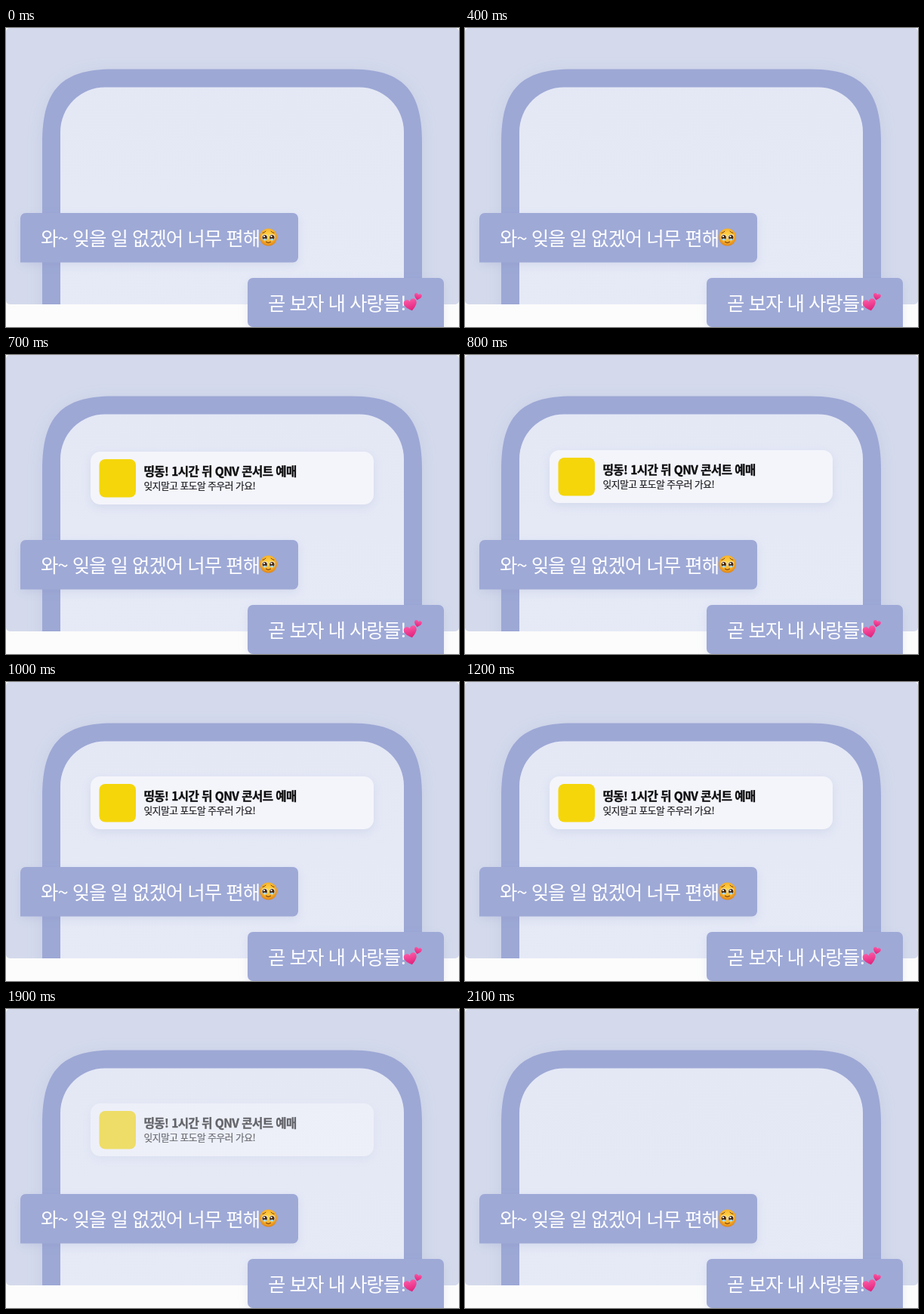
These frames come from a looping animation (600 px wide and 396 px high, 2200 ms). An HTML page:

```html
<!DOCTYPE html>
<html lang="ko">
<head>
<meta charset="utf-8">
<style>
  html, body { margin: 0; width: 100%; height: 100%; overflow: hidden; background: #fcfcfc; }
  svg { display: block; width: 600px; height: 396px; }
  text { font-family: "Noto Sans CJK KR", "Noto Sans CJK", "Noto Sans KR", sans-serif; }
  .phone { filter: drop-shadow(0 4px 10px rgba(120, 135, 190, .16)); }
  .bubble { fill: #9ea9d6; filter: drop-shadow(0 4px 6px rgba(120, 135, 190, .15)); }
  .chat { fill: #fff; font-size: 25.5px; letter-spacing: -1.05px; }
  .title { fill: #0c0c0e; stroke: #0c0c0e; stroke-width: .35px; font-size: 15.5px; font-weight: 700; letter-spacing: -.5px; }
  .note { fill: #1c1c20; stroke: #1c1c20; stroke-width: .2px; font-size: 12.75px; letter-spacing: -.5px; }
  .panel { fill: #f4f5fb; filter: drop-shadow(0 4px 6px rgba(120, 135, 190, .15)); }
  .card { animation: notify 2200ms step-end infinite; }

  /* the picture advances in 100 ms ticks */
  @keyframes notify {
    0%      { opacity: 0;   transform: translateY(20px); }
    22.727% { opacity: .5;  transform: translateY(18px); }
    27.273% { opacity: 1;   transform: translateY(8px); }
    31.818% { opacity: 1;   transform: translateY(3px); }
    36.364% { opacity: 1;   transform: translateY(1px); }
    40.909% { opacity: 1;   transform: translateY(.3px); }
    45.455% { opacity: 1;   transform: none; }
    81.818% { opacity: .9;  transform: none; }
    86.364% { opacity: .6;  transform: none; }
    90.909% { opacity: .25; transform: none; }
    95.455%, 100% { opacity: 0; transform: none; }
  }
</style>
</head>
<body>
<svg viewBox="0 0 600 396">
  <defs>
    <clipPath id="stage"><rect width="600" height="366" rx="5"/></clipPath>
    <linearGradient id="screen" x2="0" y2="1">
      <stop stop-color="#e4e8f5"/>
      <stop offset="1" stop-color="#e6eaf7"/>
    </linearGradient>
    <radialGradient id="face" cx=".5" cy=".4" r=".6">
      <stop stop-color="#ffd84c"/>
      <stop offset=".6" stop-color="#f9b62f"/>
      <stop offset="1" stop-color="#df8417"/>
    </radialGradient>
    <linearGradient id="pink" x2="0" y2="1">
      <stop stop-color="#fb58a4"/>
      <stop offset="1" stop-color="#e0207c"/>
    </linearGradient>
    <path id="heart" fill="url(#pink)" d="M0 8C-4 5-9 1-9-3.500C-9-9-2-10 0-5C2-10 9-9 9-3.500C9 1 4 5 0 8Z"/>
    <g id="eye">
      <ellipse rx="3.800" ry="4.100" fill="#fff"/>
      <ellipse cy=".2" rx="3.200" ry="3.600" fill="#43260f"/>
      <circle cx="-.8" cy="-1.200" r="1.100" fill="#fff"/>
      <ellipse cy="2.700" rx="2.400" ry="1.200" fill="#9fd8f7"/>
    </g>
  </defs>

  <g clip-path="url(#stage)">
    <rect width="600" height="366" fill="#d4daec"/>
    <path class="phone" fill="#9da8d5" d="M48 380V152C48 81 74 54.500 142 54.500H457C525 54.500 551 81 551 152V380Z"/>
    <path fill="url(#screen)" d="M72 380V137.500A59 59 0 0 1 131 78.500H468A59 59 0 0 1 527 137.500V380Z"/>
  </g>

  <g class="card">
    <rect class="panel" x="112" y="125" width="375" height="70" rx="13"/>
    <rect x="123.500" y="135" width="48.500" height="50.500" rx="8" fill="#f5d60a"/>
    <text class="title" x="182.500" y="157">띵동! 1시간 뒤 QNV 콘서트 예매</text>
    <text class="note" x="182.500" y="174.800">잊지말고 포도알 주우러 가요!</text>
  </g>

  <path class="bubble" d="M19 310.500V252A7 7 0 0 1 26 245H380A7 7 0 0 1 387 252V303.500A7 7 0 0 1 380 310.500Z"/>
  <text class="chat" x="46" y="288">와~ 잊을 일 없겠어 너무 편해</text>
  <g transform="translate(347.500 277)">
    <circle r="11.500" fill="url(#face)"/>
    <use href="#eye" x="-4.800" y=".3"/>
    <use href="#eye" x="4.800" y=".3"/>
    <g fill="none" stroke="#7a4010" stroke-linecap="round">
      <path d="M-7.500-5.500Q-5-6-3.500-7.800M7.500-5.500Q5-6 3.500-7.800"/>
      <path stroke-width="1.300" d="M-2.800 6.300Q0 8.300 2.800 6.300"/>
    </g>
  </g>

  <path class="bubble" d="M327 331H573A7 7 0 0 1 580 338V396H327A7 7 0 0 1 320 389V338A7 7 0 0 1 327 331Z"/>
  <text class="chat" x="347" y="374">곧 보자 내 사랑들!</text>
  <use href="#heart" transform="translate(536 367) rotate(-14) scale(.95)"/>
  <use href="#heart" transform="translate(545.500 356) rotate(14) scale(.55)"/>
</svg>
</body>
</html>
```
